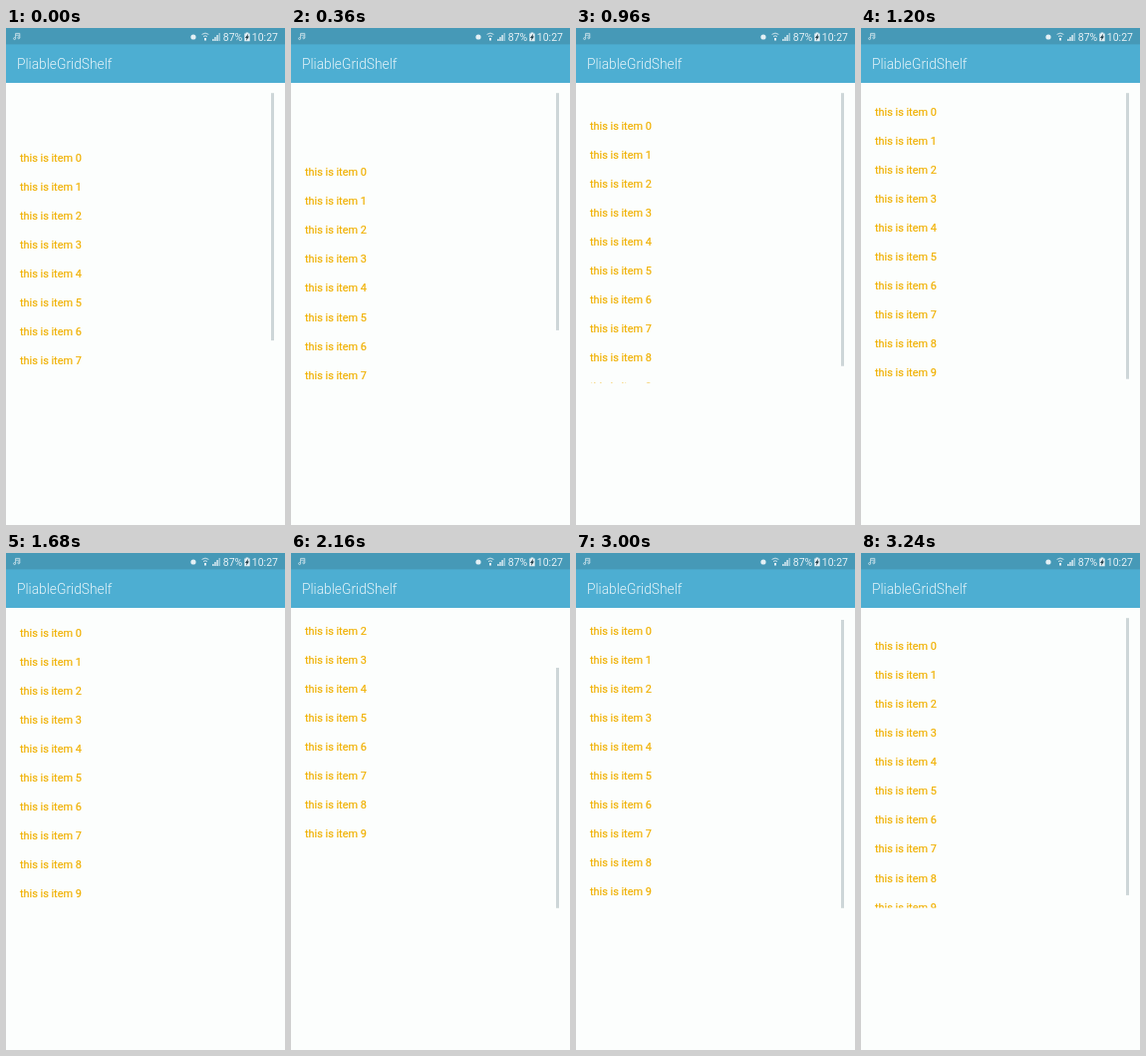
An HTML page that plays this animation: 280 px wide and 498 px high, repeating every 3.36 s.

```html
<!DOCTYPE html>
<html lang="en">
<head>
<meta charset="utf-8">
<title>Elastic list</title>
<style>
  html, body { margin: 0; width: 100%; height: 100%; overflow: hidden; background: #fcfefd; }
  svg { display: block; width: 280px; height: 498px; font-family: Roboto, sans-serif; }
  .item { font-size: 10.89px; fill: #f0b000; stroke: #f0b000; stroke-width: .22; }
  .title { font-size: 13.8px; font-weight: 300; fill: #e6f4f9; }
  .status { font-size: 10.5px; fill: #e4f0f5; }
  .line { fill: none; stroke: #dcebf1; stroke-width: .9; }
</style>
</head>
<body>
<svg viewBox="0 0 280 498">
  <defs><clipPath id="view"><rect x="0" y="65" width="280" height="290.5"/></clipPath></defs>
  <rect width="280" height="498" fill="#fcfefd"/>
  <g clip-path="url(#view)"><g id="list"></g></g>
  <rect id="bar" x="266" width="3" fill="#cdd6d8"/>

  <rect y="16" width="280" height="39" fill="#4daed2"/>
  <rect width="280" height="16.4" fill="#4699b7"/>
  <text class="title" x="11" y="40.8">PliableGridShelf</text>

  <g class="line" stroke-linejoin="round">
    <g opacity=".85">
      <path d="M9.6 10.4V5.4H13.8V9.6M9.6 7.2H13.8"/>
      <circle cx="8.6" cy="10.6" r="1"/>
      <circle cx="12.8" cy="9.8" r="1"/>
    </g>
    <path d="M196.6 6.4Q200 3.8 203.4 6.4M198 8.5Q200 7 202 8.5"/>
  </g>
  <g fill="#e4f0f5">
    <circle cx="188" cy="9" r="2.6"/>
    <path d="M199 10h2v2.6h-2z"/>
    <path d="M207.2 11h1.4v2h-1.4zM209.3 9h1.4v4h-1.4zM211.4 7h1.4v6h-1.4z"/>
    <path d="M213.5 5h1.4v8h-1.4z" opacity=".6"/>
    <path d="M240.7 4.6h2.6v1h1.4v7.6h-5.4V5.6h1.4z"/>
  </g>
  <path d="M243 5.8L240 9.9H241.5L241 12.8L244 8.6H242.5z" fill="#1c3a46"/>
  <text class="status" x="217.8" y="12.8">87%</text>
  <text class="status" x="246.8" y="12.8">10:27</text>
</svg>
<script>
const LOOP = 3360, STEP = 120;
const TOP = 65.2, HEIGHT = 290.6, ROW = 29.05, COUNT = 10;
const list = document.getElementById('list');
const bar = document.getElementById('bar');

for (let i = 0; i < COUNT; i++) {
  const label = document.createElementNS('http://www.w3.org/2000/svg', 'text');
  label.setAttribute('class', 'item');
  label.setAttribute('x', 14);
  label.setAttribute('y', TOP + 18.4 + i * ROW);
  label.textContent = 'this is item ' + i;
  list.append(label);
}

const clamp = v => Math.min(1, Math.max(0, v));
const easeOut = (p, n) => 1 - (1 - p) ** n;

// [start, duration, from, to, curve]
const moves = [
  [0, 420, 50, 65, p => easeOut(p, 2)],
  [600, 900, 65, 0, p => easeOut(p, 2.5)],
  [1680, 580, 0, -62, p => easeOut(p, 2)],
  [2320, 900, -62, 0, p => easeOut(p, 2.5)],
  [3010, 230, 0, 13.5, p => p ** 1.2]
];

function pullAt(t) {
  const [start, span, from, to, curve] = moves.findLast(m => m[0] <= t);
  return from + (to - from) * curve(clamp((t - start) / span));
}

function draw(t) {
  const pull = pullAt(t);
  list.setAttribute('transform', `translate(0 ${pull.toFixed(2)})`);

  // The thumb shrinks as the content is stretched past either end.
  const size = HEIGHT * HEIGHT / (HEIGHT + Math.abs(pull));
  bar.setAttribute('y', pull < 0 ? TOP + HEIGHT - size : TOP);
  bar.setAttribute('height', size);
  bar.setAttribute('opacity', t > 1740 ? 1 : 1 - clamp((t - 1420) / 240));
}

const began = performance.now();
function tick() {
  const t = (performance.now() - began) % LOOP;
  draw(Math.floor(t / STEP) * STEP);
  requestAnimationFrame(tick);
}
tick();
</script>
</body>
</html>
```
